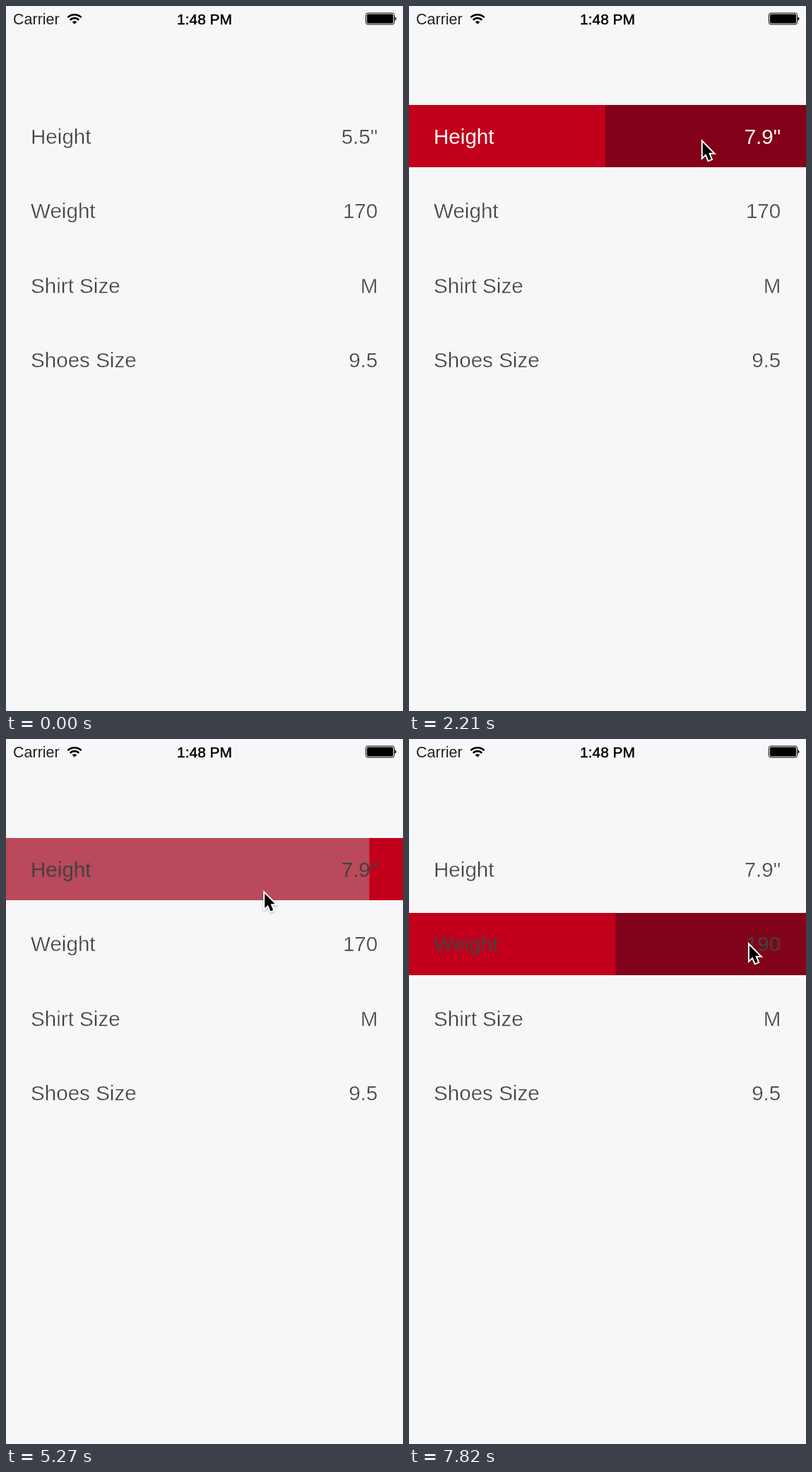
These frames come from a looping animation (562 by 997 pixels, 7.99 s). An HTML page:

```html
<!DOCTYPE html>
<html lang="en">
<head>
<meta charset="utf-8">
<title>Swipe to adjust</title>
<style>
  html, body { margin: 0; height: 100%; overflow: hidden; background: #f7f7f9; }
  svg { display: block; width: 100vw; height: 100vh; }
  text { font-family: "Liberation Sans", Arial, sans-serif; }
  #rows { font-size: 29.6px; fill: #424242; }
  /* A background-coloured outline thins the strokes of idle text. */
  .idle { stroke: #f7f7f9; stroke-width: .45px; }
  .held { fill: #fff; }
  .value { text-anchor: end; }
  #pointer { filter: drop-shadow(0 1px 1px rgba(0, 0, 0, .3)); }
</style>
</head>
<body>
<svg viewBox="0 0 562 997">
  <text x="10" y="26" font-size="21.5" fill="#222">Carrier</text>
  <text x="281" y="26" font-size="20.9" text-anchor="middle" stroke="#000" stroke-width=".5">1:48 PM</text>
  <g fill="none" stroke="#000" stroke-width="2.6">
    <path d="M87.3 16.2a13.8 13.8 0 0 1 19.4 0M90.7 19.7a9 9 0 0 1 12.6 0"/>
    <path d="M97 25.8l-3.2-3.3a4.5 4.5 0 0 1 6.4 0z" fill="#000" stroke="none"/>
  </g>
  <rect x="509.5" y="10" width="40" height="16" rx="2.5" fill="none" stroke="#000"/>
  <rect x="511" y="11.5" width="37" height="13" rx="1.5"/>
  <path d="M550.5 15.3q2 .6 2 2.7t-2 2.7z"/>

  <rect id="shade" width="562" height="88"/>
  <rect id="fill" height="88" fill="#c2001b"/>
  <g id="rows"></g>
  <path id="pointer" d="M0 0V20.5L4.6 16.2L8.3 25L12 23.5L8.4 14.8H14.5Z"
        stroke="#fff" stroke-width="4" paint-order="stroke"/>
</svg>
<script>
const STEP = 170, STEPS = 47;    // the picture advances in steps of 170 ms
const FADE = 2.9, TRAVEL = 4;    // steps to fade a row, to move between swipes
const ROW_PITCH = 105.4;

// press, stop and release are in steps; from and to are pointer positions
const swipes = [
  { row: 0, press: 4.45, stop: 18, release: 19.95, from: [148, 182], to: [468, 195], drag: 332, dip: 80 },
  { row: 0, press: 26.1, stop: 29, release: 30.13, from: [466, 186], to: [391, 207], drag: -57, dip: 0 },
  { row: 1, press: 36.91, stop: 45, release: 45.96, from: [187, 302], to: [482, 292], drag: 293, dip: 0 }
];

const rows = [
  { label: "Height", value: d => (5.5 + .0086 * d).toFixed(1) + '"' },
  { label: "Weight", value: d => Math.round(170 + .068 * d) },
  { label: "Shirt Size", value: () => "M" },
  { label: "Shoes Size", value: () => "9.5" }
];

const $ = id => document.getElementById(id);
const clamp = v => Math.min(1, Math.max(0, v));
const smooth = p => p * p * (3 - 2 * p);
const mix = (a, b, p) => a.map((v, i) => v + (b[i] - v) * p);

function set(el, attrs) {
  for (const name in attrs) el.setAttribute(name, attrs[name]);
}

function addText(x, y) {
  const el = document.createElementNS("http://www.w3.org/2000/svg", "text");
  set(el, { x, y });
  return $("rows").appendChild(el);
}

rows.forEach((row, i) => {
  const y = 195 + i * ROW_PITCH;
  row.name = addText(35, y);
  row.amount = addText(526.3, y);
  row.name.textContent = row.label;
});

// Eased share of the drag; negative while the pointer approaches.
function progress(swipe, step) {
  const p = (step - swipe.press) / (swipe.stop - swipe.press);
  return Math.sin(Math.PI / 2 * Math.min(1, p));
}

function pointerAt(swipe, next, step) {
  if (step < swipe.release) return mix(swipe.from, swipe.to, progress(swipe, step));
  const p = clamp((step - swipe.release) / TRAVEL);
  const [x, y] = mix(swipe.to, next.from, smooth(p));
  return [x, y + swipe.dip * Math.sin(Math.PI * p)];
}

function draw(step) {
  const index = Math.max(0, swipes.findLastIndex(s => step >= s.press));
  const swipe = swipes[index];
  const pressed = step >= swipe.press;
  const faded = clamp((step - swipe.release) / FADE);
  const opacity = pressed ? 1 - faded : 0;
  const drag = pressed ? swipe.drag * progress(swipe, step) : 0;
  const size = Math.abs(drag) * (1 - faded ** 1.5);
  const y = Math.round(140.4 + swipe.row * ROW_PITCH);
  const red = Math.round(166 - .07 * size - .0002 * size * size);

  set($("shade"), { y, opacity, fill: `rgb(${red},0,${Math.round(28 - .012 * size)})` });
  set($("fill"), { x: drag < 0 ? 562 - size : 0, y, width: size });
  set($("pointer"), {
    transform: `translate(${pointerAt(swipe, swipes[index + 1] || swipe, step)})`,
    visibility: step ? "visible" : "hidden"
  });

  rows.forEach((row, i) => {
    const total = swipes.filter(s => s.row === i && step >= s.press)
      .reduce((sum, s) => sum + s.drag * progress(s, step), 0);
    const state = i !== swipe.row || !opacity ? "idle" : opacity === 1 ? "held" : "";
    row.amount.textContent = row.value(total);
    set(row.name, { class: state });
    set(row.amount, { class: "value " + state });
  });
}

const start = performance.now();
function tick() {
  draw(Math.floor((performance.now() - start) / STEP) % STEPS);
  requestAnimationFrame(tick);
}
tick();
</script>
</body>
</html>
```
